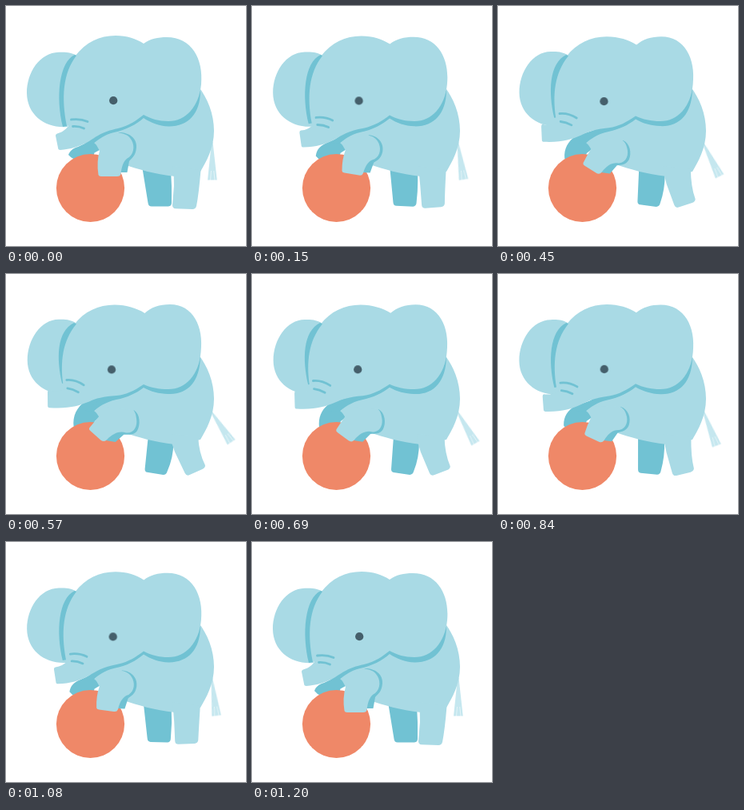
These frames come from a looping animation (300 px wide and 300 px high, 1.23 s). An HTML page:

```html
<!DOCTYPE html>
<html lang="en">
<head>
<meta charset="utf-8">
<title>Elephant with a ball</title>
<style>
  :root { --light: #a9dae5; --dark: #71c2d3; --ball: #ef8868; --eye: #455f6b; --hair: #c5e7ef; }
  html, body { margin: 0; width: 100%; height: 100%; overflow: hidden; background: #fff; }
  svg { display: block; width: 100vw; height: 100vh; }

  .light { fill: var(--light); }
  .dark { fill: var(--dark); }
  .line { fill: none; stroke: var(--dark); stroke-width: 2.8; stroke-linecap: round; }

  /* Out in 600 ms, back in 600 ms, then a 30 ms rest */
  .morph { d: var(--a); animation: morph 1230ms linear infinite; }
  .move { animation: move 1230ms linear infinite; }
  @keyframes morph {
    0%, 97.561%, 100% { d: var(--a); }
    48.7805% { d: var(--b); }
  }
  @keyframes move {
    0%, 97.561%, 100% { transform: none; }
    48.7805% { transform: var(--to); }
  }

  #tail { --to: rotate(-35deg); transform-origin: 257.5px 174px; }
  #eye { --to: translate(-2.3px, 1.4px); fill: var(--eye); }

  #far-hind {
    --a: path("M170,200 L177.5,246 Q178,250.5 182,250.5 L203,250.5 Q207,250 207,246 Q207.5,225 206,205 Z");
    --b: path("M178.5,200 L173.4,243.6 Q173.3,247 176,247.6 L196,251 Q200,251.2 201.2,247 Q209.5,230 209.5,210 Z");
  }
  #far-fore {
    --a: path("M78,186 C80,181 83,178 90,176 L128,158 L122,172 L117,180 L110.5,183.5 L109,190 L86,192 Q81,190 78,186 Z");
    --b: path("M85,192 C83,177 89,166 100,158 L130,150 L124,170 L117,179 L111,184 L108,192 L92,196 Q87,196 85,192 Z");
  }
  #near-hind {
    --a: path("M208,200 Q210.5,212 210,225 L208,249 Q208,253 212,253.3 L233,254 Q237,254 238,250 Q241,235 243.5,205 Z");
    --b: path("M205,200 Q206.5,212 211,222 L224.5,249 Q226.5,252.8 230.5,251 L246,243.5 Q250,241.5 249.5,238.5 Q241,223 240,203 Z");
  }
  #fore-shade {
    --a: path("M141,158 C155,158 164,166 163,177 C162,188 157,190 154,194 L151.5,208 L143,208 L130,180 Z");
    --b: path("M161,171 C168.5,176 168.5,190 164,197 C159,203 153,201 147,201 L136,210 L124,208 L140,185 Z");
  }
  #near-fore {
    --a: path("M112,172 L117,181 Q113,195 115.5,211 Q116,213 119,213 L139,213 Q143,213 143.5,210 C145,198 148,192 154,189 C161,183 161,172 155,165 C152,161 146,159 141,158.5 L118,165 Z");
    --b: path("M112,172 L116,178 Q110.5,184 103.5,191.5 Q102.5,193.5 105,195.5 L117.5,207.5 Q121.5,210.5 125,207 C134,198.5 142,196 150,199 C161,200 164.5,190 163.5,182 C163,176 162,173 160.5,171 L118,165 Z");
  }
  #far-ear {
    --a: path("M90,63 C82,57.5 74,57.5 66,57.8 C42,58.5 26,83 26,109 C26.5,137 50,153.5 77,151 L90,120 Z");
    --b: path("M90,63 C82,57 74,56.5 66,56.8 C43,57 27,82 26.8,108 C27,135 50,152 77,149.5 L90,120 Z");
  }
  #head-shade {
    --a: path("M243,106 C243,135 227,151 203,150.5 C191,150 181,146 172,140 C163,148 150,155 135,158 C122,161 116,167 110,171 L96,172 L140,140 Z");
    --b: path("M243,104 C242,135 227,151 203,150 C191,149.5 181,147 172,142 C163,149 152,154 138,157 C124,160 115,167 110,171 L98,172 L140,140 Z");
  }
  #head {
    --a: path("M86,63 C100,45 117,37 137,37 C151,37 163,41 172,47 C180,41 190,39 201,39 C232,39 247,66 244,98 C241,126 225,144 203,144 C191,144 181,141 172,136 C163,143 155,149 140,153 C120,157 112,164 104,169 C92,176 80,179 68,180 Q65,180 65,177 L62,162 Q62,160 64,159.5 C70,158 74,155 78,150 L72,140 C70,110 75,80 86,63 Z");
    --b: path("M85,63.5 C98,46.5 115.5,39 135.5,38.7 C151,38.7 163,43 173.5,49 C181,42 192,38 205,38 C234,38 247.5,66 243.5,98 C241,126 225,144 203,144 C191,144 181,142 172,138 C160,146 150,151 138,152 C122,153 112,155 104,159 C91,164 80,168 54,166.5 Q51.5,166.5 51.5,164 L51.5,147 Q51.5,144 53,144 C60,147 66,146 72,144 L72,140 C70,110 75,80 85,63.5 Z");
  }
  #ear-shade {
    --a: path("M86,61 C66,70 62,115 71,151 L76,150 C69,115 71,84 88,62 Z");
    --b: path("M85,61 C63,72 63,105 70,136 L71,136 C68,110 70,84 88,62.5 Z");
  }
  #fold-1 {
    --a: path("M81.5,142 Q93,140.5 102,144.5");
    --b: path("M75.5,132 Q86,131 97,138.5");
  }
  #fold-2 {
    --a: path("M83.5,150.5 Q91,150 97.5,153");
    --b: path("M76.5,142.5 Q83,143.5 90,147.5");
  }
</style>
</head>
<body>
<svg viewBox="0 0 300 300">
  <path id="far-hind" class="dark morph"/>
  <path id="far-fore" class="dark morph"/>

  <g id="tail" class="move">
    <path fill="var(--hair)" d="M257,170 L252,217.5 H263.7 L258.5,170 Z"/>
    <path stroke="#fff" stroke-width=".5" d="M255.5,218 L256.5,206 M261,218 L259.8,206"/>
  </g>

  <path class="light" d="M240,100 C252,115 260,135 260,156 C260,178 250,195 243,207 L211,213 C185,210 165,204 147,198 L118,178 L110,171 L122,160 L170,135 Z"/>
  <path id="near-hind" class="light morph"/>

  <circle cx="105.5" cy="227.5" r="42.6" fill="var(--ball)"/>

  <path id="fore-shade" class="dark morph"/>
  <path id="near-fore" class="light morph"/>

  <path id="far-ear" class="light morph"/>
  <path id="head-shade" class="dark morph"/>
  <path id="head" class="light morph"/>
  <path id="ear-shade" class="dark morph"/>
  <path id="fold-1" class="line morph"/>
  <path id="fold-2" class="line morph"/>
  <circle id="eye" class="move" cx="134.2" cy="118.2" r="5.1"/>
</svg>
</body>
</html>
```
